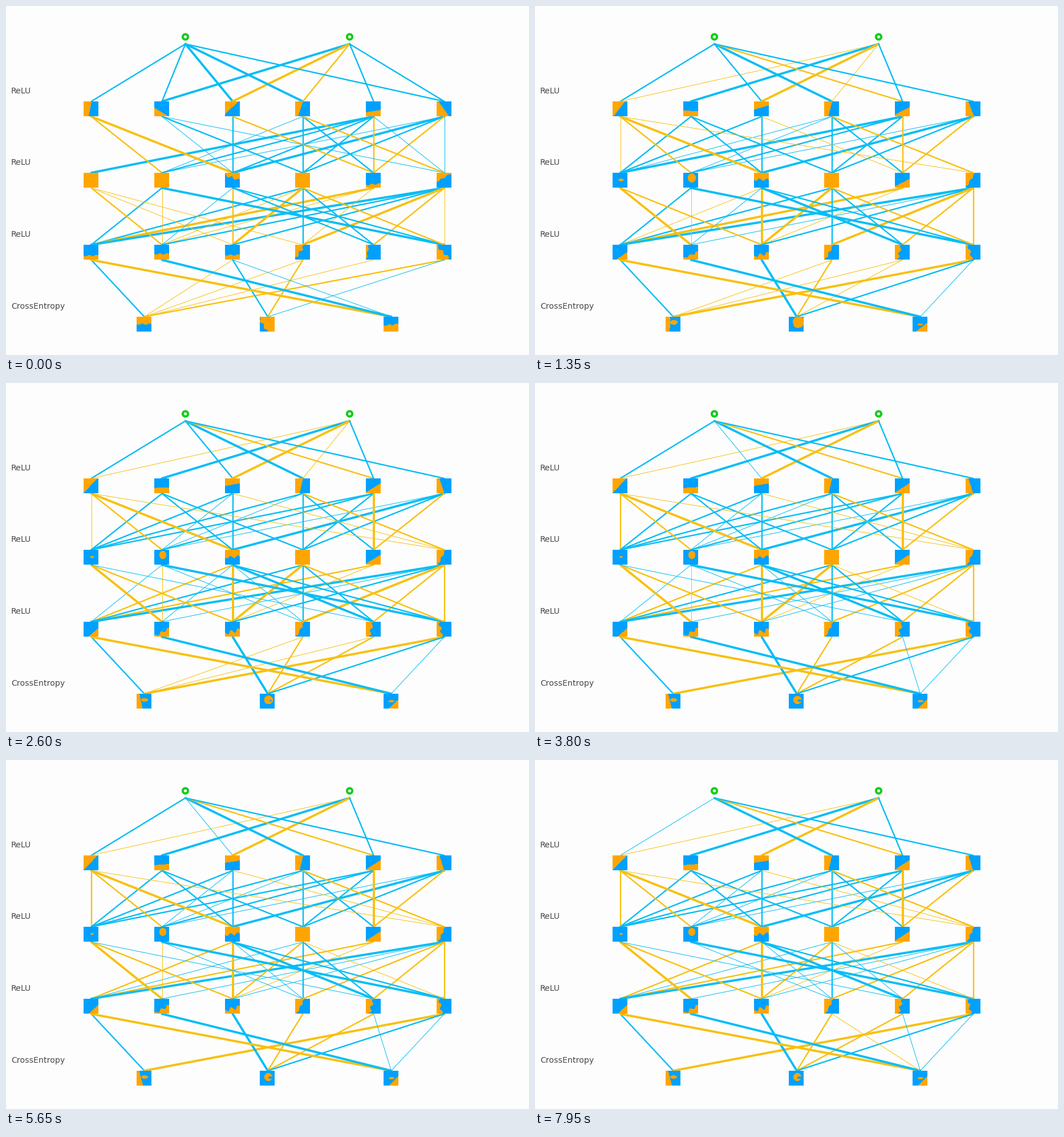
Write a matplotlib script that moves like this. It is 917 px wide and 611 px high and loops after 8 s.

```python
import matplotlib.pyplot as plt
import numpy as np
from matplotlib.animation import FuncAnimation
from matplotlib.patches import Circle

W, H, DPI = 917, 611, 100
STEP, LOOP = 50, 8000
PX = 72 / DPI
SIZE = 26

SKY, AMBER = "#06bdf6", "#f8c010"
ORANGE, BLUE = (255, 165, 0), (0, 160, 255)
WIDTHS = (0, 1, 2.4, 3.9)

INPUTS = (314, 602)
HIDDEN = [round(149 + 123.8 * i) for i in range(6)]
OUTPUTS = [242 + 216.5 * i for i in range(3)]
COLUMNS = (INPUTS, HIDDEN, HIDDEN, HIDDEN, OUTPUTS)
TOPS = (40, 167, 292, 418, 544)

fig = plt.figure(figsize=(W / DPI, H / DPI), dpi=DPI, facecolor="#fdfdfd")
ax = fig.add_axes([0, 0, 1, 1])
ax.axis("off")

# ---- connections: a weight, or (from, to[, seconds of the ramp]) ------
links = []


def fan(layer, src, targets):
    for dst, weight in targets.items():
        ramp = weight if isinstance(weight, tuple) else (weight, weight)
        line, = ax.plot((COLUMNS[layer][src] + 0.5,
                         COLUMNS[layer + 1][dst] + 0.5),
                        (TOPS[layer] + SIZE + 0.5, TOPS[layer + 1]),
                        solid_capstyle="round", zorder=2 + dst / 10)
        links.append((line, ramp))


def weight_at(t, start, end, seconds=1.5):
    return round(start + (end - start) * min(t / seconds, 1))


fan(0, 0, {0: (2, 1, 13), 1: (2, 0), 2: (3, 0, 7), 3: 3, 4: (0, -2), 5: 2})
fan(0, 1, {0: (0, -1), 1: 3, 2: -3, 3: (-2, 0, 5), 4: 2, 5: (2, 0)})

fan(1, 0, {0: (0, -2, 4.5), 1: -2, 2: -3, 5: (0, -1)})
fan(1, 1, {0: (0, 2), 2: (1, 2), 3: 2, 5: (1, 0)})
fan(1, 2, {0: (0, 2), 1: (0, 1, 3), 2: 2, 4: (-2, 0, 3), 5: (0, -1, 3)})
fan(1, 3, {0: (0, 2, 3), 1: 1, 3: 2, 4: 2, 5: -2})
fan(1, 4, {0: (3, 2, 4.4), 1: 2, 2: (2, 0, 1), 3: 2, 4: (-2, -3, 4.4),
           5: (1, 0)})
fan(1, 5, {1: 1, 2: 3, 3: 2, 4: -2, 5: (1, 0)})

fan(2, 0, {1: (-2, -3), 2: (-1, -2), 3: (-1, 0), 4: (0, 1, 3)})
fan(2, 1, {0: (2.4, 0, 6.5), 1: (-1, 0, 13), 3: (0, 1, 3), 5: 3})
fan(2, 2, {0: (0, -2, 2.4), 1: (1, 0, 6.5), 2: (-2, -3), 3: (0, 1, 4),
           4: (2, 3), 5: 2})
fan(2, 3, {0: (2, 1, 9.4), 1: (-1, 0, 2.6), 2: (-3, -2, 9.4), 3: 2,
           4: (2, 1, 13), 5: (-2, -1, 6.4)})
fan(2, 4, {0: (-3, -2, 4.4), 1: (-1, 0), 2: (0, -1), 3: (-1, 0)})
fan(2, 5, {0: 3, 1: (2, 1), 2: (2.4, 1, 4.8), 3: (-3, -2, 6.4), 4: -2,
           5: (-1, -2, 2.6)})

fan(3, 0, {0: 2, 2: -3})
fan(3, 1, {2: 3})
fan(3, 2, {0: (-1, 0, 2.6), 1: (2, 3), 2: (1, 0)})
fan(3, 3, {0: (-1, 0, 6.4), 1: -2, 2: (0, -1, 13)})
fan(3, 4, {0: (-1, 0, 6.4), 1: (0, -2, 2.8), 2: (0, 1, 6.4)})
fan(3, 5, {0: (-2, -3, 2.6), 1: (1, 2), 2: (0, 1)})

# ---- activation maps: fields that are orange where positive -----------
GX, GY = np.meshgrid(np.arange(SIZE) + 0.5, np.arange(SIZE) + 0.5)
FULL = np.full((SIZE, SIZE), 3.0)
cells = []


def edge(angle, shift, wave=0):
    """Orange lies towards the angle; shift moves the border outwards."""
    c, s = np.cos(np.radians(angle)), np.sin(np.radians(angle))
    x, y = GX - SIZE / 2, GY - SIZE / 2
    return c * x + s * y + shift + wave * np.sin((c * y - s * x) / 2)


def spot(x, y, rx, ry):
    return (1 - np.hypot((GX - x) / rx, (GY - y) / ry)) * min(rx, ry)


def row(layer, *pairs):
    top = TOPS[layer]
    for x, (start, end) in zip(COLUMNS[layer], pairs):
        left = round(x) - SIZE // 2
        img = ax.imshow(np.zeros((SIZE, SIZE, 3), np.uint8), aspect="auto",
                        extent=(left, left + SIZE, top + SIZE, top),
                        interpolation="nearest", zorder=4)
        cells.append((img, start, end))


row(1,
    (edge(191, -1.5), edge(225, -0.7)),
    (edge(121, -5), edge(86, -3)),
    (edge(227, -2.2), edge(261, -2)),
    (edge(199, -3.3), edge(193, -2)),
    (edge(81, -4), edge(57, -2.9)),
    (edge(144, -0.4), edge(163, -3.8)))
row(2,
    (FULL, spot(15, 12.5, 3, 1.4)),
    (FULL, spot(15, 9, 6, 7)),
    (edge(290, -4, 2), edge(265, 0, 2)),
    (FULL, FULL),
    (edge(85, -7, 1), edge(57, -2.7)),
    (edge(240, -4, 1), edge(205, -3.5, 1)))
row(3,
    (edge(88, -6, 1), edge(48, -7)),
    (edge(90, -3, 1), edge(60, -5, 2)),
    (edge(88, -5, 1), edge(75, -4, 3)),
    (edge(215, -4, 2), edge(207, -3, 1)),
    (edge(190, -10, 1), edge(195, -3, 2)),
    (edge(135, -1, 2), edge(170, -6, 2)))
row(4,
    (edge(270, 0, 1), np.maximum(edge(165, -5), spot(14, 11, 6, 3))),
    (edge(330, 7, 2), np.minimum(spot(15, 11, 7, 7), -spot(19, 12, 4, 2))),
    (edge(85, -1, 1), np.maximum(edge(45, -7), spot(14, 13, 5, 2))))

# ---- fixed parts -------------------------------------------------------
for x in INPUTS:
    ax.add_patch(Circle((x + 0.5, 54), 4.6, fill=False, ec="#14cd1e",
                        lw=4 * PX, zorder=5))
for name, top in zip(("ReLU", "ReLU", "ReLU", "CrossEntropy"), TOPS[1:]):
    ax.text(9, top - 13.7, name, family="DejaVu Sans", size=14.1 * PX,
            color="#484848", va="baseline")
ax.set_xlim(0, W)
ax.set_ylim(H, 0)


def draw(n):
    t = n * STEP / 1000
    for line, ramp in links:
        w = weight_at(t, *ramp)
        line.set_visible(w != 0)
        line.set_color(SKY if w > 0 else AMBER)
        line.set_linewidth(WIDTHS[abs(w)] * PX)

    u = 1 - np.exp(-t / 0.9)
    for img, start, end in cells:
        field = start + (end - start) * u
        img.set_data(np.where(field[..., None] > 0, ORANGE, BLUE)
                     .astype(np.uint8))
    return []


anim = FuncAnimation(fig, draw, frames=LOOP // STEP, interval=STEP,
                     repeat=True, repeat_delay=0, blit=False)
plt.show()
```
